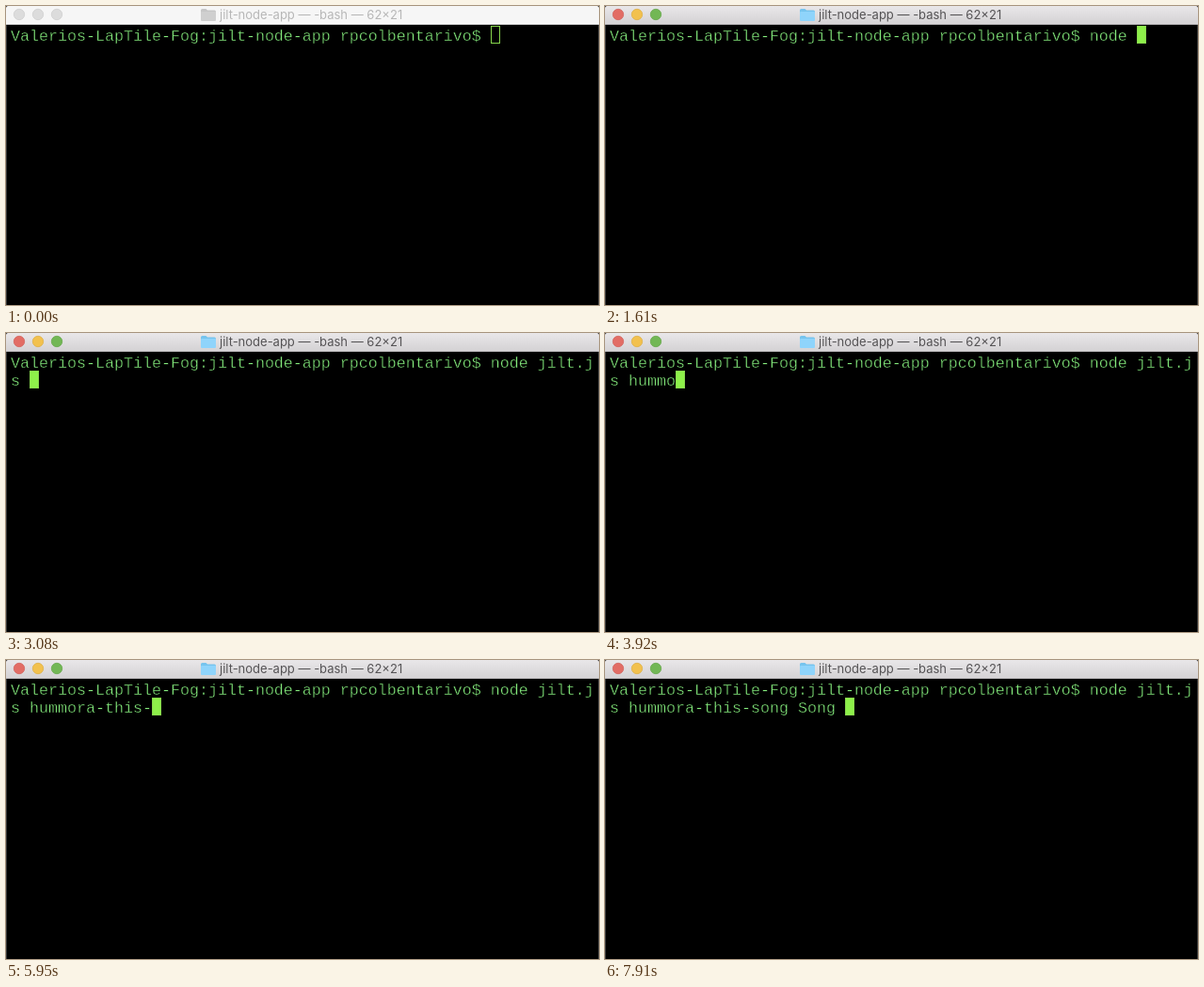
Recreate the animation shown at these times as an HTML page. Size 630 by 318 pixels, loop 8 s.

```html
<!DOCTYPE html>
<html lang="en">
<head>
<meta charset="utf-8">
<title>Terminal</title>
<style>
  html, body { margin: 0; width: 100%; height: 100%; overflow: hidden; background: #000; }
  svg { display: block; width: 630px; height: 318px; }
  .title { font: 13px Inter, Roboto, sans-serif; fill: #b7b7b7; }
  .shell {
    font: 16.664px "Liberation Mono", "DejaVu Sans Mono", monospace;
    fill: #84ea7c; white-space: pre;
    stroke: #000; stroke-width: .35; /* thins the letters */
  }
  .dot { fill: #dcdcdc; stroke: #d0d0d0; stroke-width: .8; }
  .folder { fill: #cfcfcf; }
  .flap { fill: #c6c6c6; }
  .bar { fill: #f6f6f6; }
  .edge { fill: #dcdcdc; }
  #cursor { fill: none; stroke: #86d64c; }

  .active .title { fill: #555355; }
  .active .bar { fill: url(#chrome); }
  .active .edge { fill: #bebcbe; }
  .active .folder { fill: #8fd4fb; }
  .active .flap { fill: #76c4ee; }
  .active .red { fill: #e26d65; stroke: #d4635c; }
  .active .yellow { fill: #f2c14e; stroke: #dfb047; }
  .active .green { fill: #72b755; stroke: #66a84b; }
  .active #cursor { fill: #8ef04a; }
</style>
</head>
<body>
<svg id="win" viewBox="0 0 630 318">
  <defs>
    <linearGradient id="chrome" x1="0" y1="0" x2="0" y2="1">
      <stop offset="0" stop-color="#e9e7e9"/>
      <stop offset="1" stop-color="#d3d1d3"/>
    </linearGradient>
  </defs>
  <rect width="630" height="318" fill="#000"/>
  <path d="M.5 20V318M629.5 20V318" stroke="#3c3c3c"/>
  <path class="bar" d="M0 20V2Q0 0 2 0H628Q630 0 630 2V20Z"/>
  <rect class="edge" y="19" width="630" height="1"/>
  <circle class="dot red" cx="14" cy="9" r="5.7"/>
  <circle class="dot yellow" cx="34" cy="9" r="5.7"/>
  <circle class="dot green" cx="54" cy="9" r="5.7"/>
  <path class="flap" d="M207 15V4.5Q207 3 208.500 3H212.500L214 4.500H221.500Q223 4.500 223 6V15Z"/>
  <rect class="folder" x="207" y="6" width="16" height="10" rx="1"/>
  <text class="title" x="227" y="14">jilt-node-app — -bash — 62×21</text>
  <text class="shell" id="row0" x="5" y="37"></text>
  <text class="shell" id="row1" x="5" y="56"></text>
  <rect id="cursor" width="9" height="18"/>
</svg>
<script>
const LOOP = 8000, FOCUS = 420, COLS = 62, CELL = 10, ROW = 19;
const PROMPT = "Valerios-LapTile-Fog:jilt-node-app rpcolbentarivo$ ";

// Each entry: typed text and the time of each of its keys.
const TYPING = [
  ["node ", [910, 1120, 1260, 1400, 1610]],
  ["jilt.js ", [1820, 2030, 2100, 2170, 2380, 2590, 2870, 3080]],
  ["hummora", [3290, 3430, 3570, 3710, 3920, 4060, 4200]],
  ["-this-", [4830, 5040, 5250, 5460, 5740, 5880]],
  ["song ", [6230, 6300, 6440, 6580, 7140]],
  ["Song ", [7490, 7560, 7700, 7770, 7910]]
];
const command = TYPING.map(([text]) => text).join("");
const keys = TYPING.flatMap(([, times]) => times);

const byId = id => document.getElementById(id);
const win = byId("win"), cursor = byId("cursor");
const rows = [byId("row0"), byId("row1")];
let shown = "";

function draw(t) {
  const count = keys.filter(k => k <= t).length;
  const active = t >= FOCUS;
  const state = count + "/" + active;
  if (state === shown) return;
  shown = state;

  const line = PROMPT + command.slice(0, count);
  rows.forEach((row, i) => {
    row.textContent = line.slice(i * COLS, (i + 1) * COLS);
  });
  cursor.setAttribute("x", 5.5 + line.length % COLS * CELL);
  cursor.setAttribute("y", 21.5 + Math.floor(line.length / COLS) * ROW);
  win.classList.toggle("active", active);
}

const start = performance.now();
function tick() {
  draw((performance.now() - start) % LOOP);
  requestAnimationFrame(tick);
}
tick();
</script>
</body>
</html>
```
